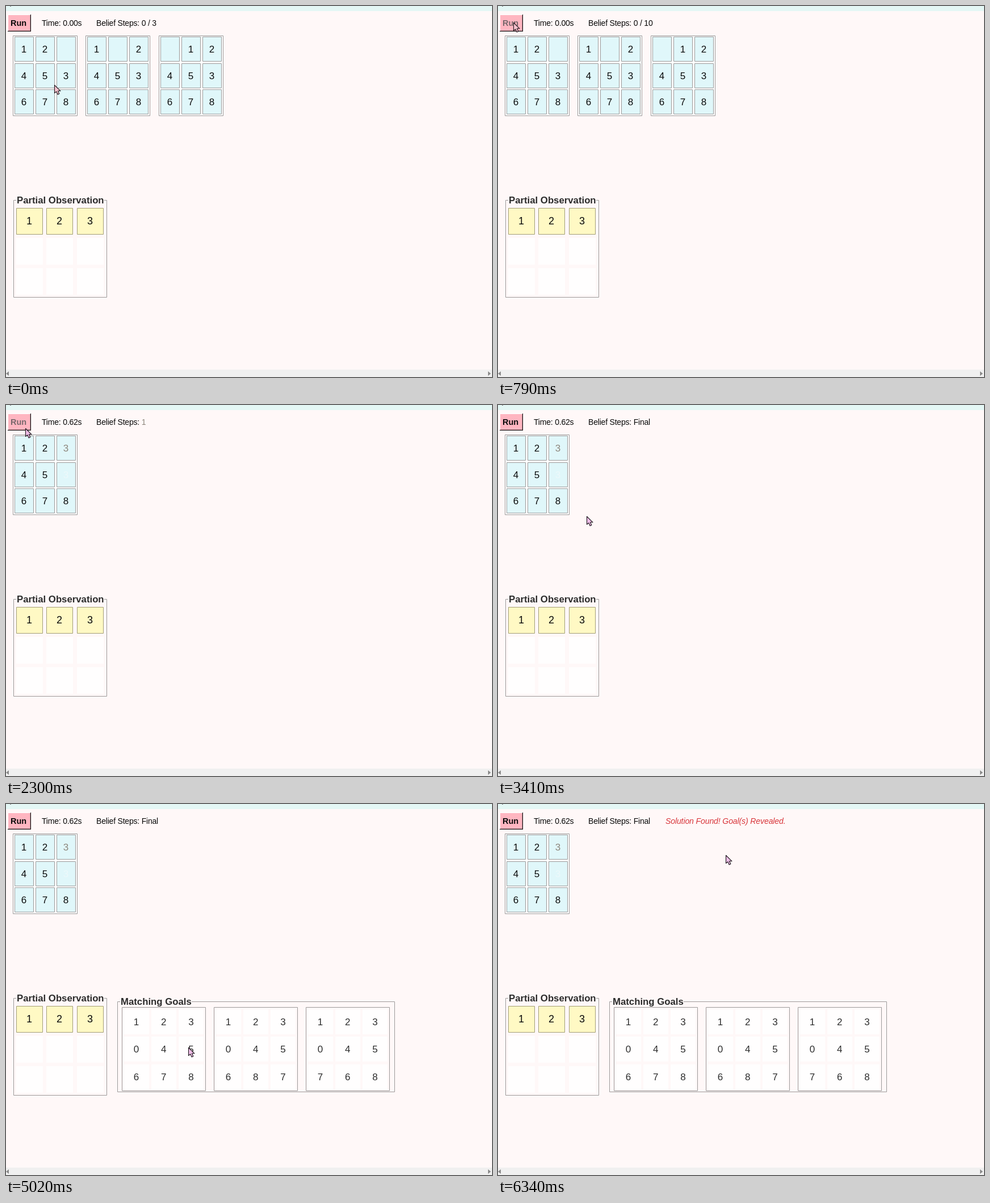
Write an HTML page with a canvas that moves like this. It is 856x654 px and loops after 7340 ms.

```html
<!DOCTYPE html>
<html lang="en">
<head>
<meta charset="utf-8">
<title>Belief state puzzle</title>
<style>
html, body { margin: 0; width: 100%; height: 100%; overflow: hidden; background: #fff8f8; }
canvas { display: block; }
</style>
</head>
<body>
<canvas id="stage" width="856" height="654"></canvas>
<script>
const ctx = document.getElementById('stage').getContext('2d');
const LOOP = 7340;
const BG = '#fff8f8', LINE = '#9c9a9a', CYAN = '#e0f7fa', INK = '#0a0a0a';
const FAMILY = '"Liberation Sans", Arial, sans-serif';

// start, end, number of jumps, target of the pointer tip
const MOVES = [
  [100, 390, 4, 27, 29],
  [2300, 2300, 1, 34, 41],
  [2600, 2910, 4, 129, 161],
  [3310, 3410, 2, 156, 196],
  [4720, 5020, 4, 321, 429],
  [5330, 5330, 1, 328, 429],
  [5730, 5730, 1, 335, 421],
  [5840, 6340, 6, 401, 90]
];

function rect(x, y, w, h, fill) {
  ctx.fillStyle = fill;
  ctx.fillRect(x, y, w, h);
}

function frame(x, y, w, h, color = LINE) {
  ctx.strokeStyle = color;
  ctx.lineWidth = 1;
  ctx.strokeRect(x + 0.5, y + 0.5, w - 1, h - 1);
}

function text(str, x, y, size, { color = INK, style = '', align = 'left', spacing = 0 } = {}) {
  ctx.font = `${style} ${size}px ${FAMILY}`;
  ctx.letterSpacing = spacing + 'px';
  ctx.textAlign = align;
  ctx.fillStyle = color;
  ctx.fillText(str, x, y);
}

function digit(str, x, y, size, color) {
  text(str, x, y, size, { color, align: 'center' });
}

function triangle(x, y, dx) {
  ctx.fillStyle = '#8a8a8a';
  ctx.beginPath();
  ctx.moveTo(x, y);
  ctx.lineTo(x - dx, y - 4);
  ctx.lineTo(x - dx, y + 4);
  ctx.fill();
}

function board(x, tiles, solved) {
  rect(x, 52, 114, 142, '#fff');
  frame(x, 52, 114, 142);
  [...tiles].forEach((n, i) => {
    const cx = x + 3 + 37 * (i % 3);
    const cy = Math.floor(54.5 + 46.5 * Math.floor(i / 3));
    rect(cx, cy, 34, 44, CYAN);
    frame(cx, cy, 34, 44);
    const color = solved && i === 2 ? '#8c857b' : solved && i === 5 ? '#edf8fa' : INK;
    digit(n, cx + 16.5, cy + 28, 17, color);
  });
}

function header(t) {
  rect(0, 0, 856, 9, '#e4f7f5');
  rect(7, 0, 2, 1, '#777');

  const pressed = t >= 590 && t < 690;
  const disabled = t >= 690 && t < 3310;
  const shift = pressed ? 1 : 0;
  rect(3, 15, 41, 30, pressed ? '#fff' : '#151012');
  rect(3, 15, 40, 29, pressed ? '#151012' : '#fff');
  rect(4, 16, 39, 28, '#b98990');
  rect(4, 16, 38, 27, '#ffb6c1');
  text('Run', 8 + shift, 35 + shift, 14.5, { style: 'bold', color: disabled ? '#77676b' : INK });

  text(`Time: ${t < 1190 ? '0.00' : '0.62'}s`, 63, 35, 14, { spacing: -0.2 });
  const label = 'Belief Steps: ';
  text(label, 159, 35, 14, { spacing: -0.2 });
  const x = 159 + ctx.measureText(label).width;
  const step = t < 790 ? '0 / 3' : t < 1190 ? '0 / 10' : t < 3310 ? '1' : 'Final';
  text(step, x, 35, 14, { spacing: -0.2, color: step === '1' ? '#8c857b' : INK });

  if (t >= 5330) {
    text('Solution Found! Goal(s) Revealed.', 295, 35, 14,
      { style: 'italic', color: '#d8353a', spacing: -0.1 });
  }
}

function beliefs(t) {
  const solved = t >= 1190;
  board(12, solved ? '12345 678' : '12 453678', solved);
  if (solved) {
    // the tile slides up and the blank takes its place
    const swap = [['3', 2], ['3', 5]];
    for (const [n, i] of swap) {
      const y = i === 2 ? 54 : 101;
      rect(90, y + 1, 32, 42, CYAN);
      digit(n, 105.5, y + 28, 17, i === 2 ? '#8c857b' : '#edf8fa');
    }
  }
  if (t < 1290) {
    ctx.globalAlpha = solved ? 0.4 : 1;
    board(140, '1 2453678');
    board(269, ' 12453678');
    ctx.globalAlpha = 1;
  }
}

function group(title, x, y, w, h, titleWidth) {
  frame(x, y, w, h);
  rect(x + 5, y - 1, titleWidth, 3, BG);
  text(title, x + 6, y + 6, 16.75, { style: 'bold', color: '#2c2c2c' });
}

function observation() {
  group('Partial Observation', 13, 342, 165, 172, 155);
  for (let i = 0; i < 9; i++) {
    const x = Math.round(18 + 53.4 * (i % 3));
    const row = Math.floor(i / 3);
    const y = 356 + 53 * row;
    rect(x, y, 47, 47, row ? '#fffefe' : '#fff9c4');
    if (!row) {
      frame(x, y, 47, 47, '#a29f78');
      digit(i + 1, x + 23, y + 29, 18, INK);
    }
  }
}

function goals() {
  group('Matching Goals', 196, 348, 489, 160, 126);
  ['123045678', '123045687', '123045768'].forEach((tiles, k) => {
    const x = 204 + 162 * k;
    frame(x, 358, 148, 148);
    [...tiles].forEach((n, i) => {
      const cx = x + 25.5 + 48.3 * (i % 3);
      const cy = 384 + 48.3 * Math.floor(i / 3);
      rect(Math.round(cx - 22), Math.round(cy - 22), 44, 44, '#fffefe');
      digit(n, cx, Math.round(cy + 6), 17, '#2c2c2c');
    });
  });
}

function pointerAt(t) {
  let x = 85, y = 139;
  for (const [start, end, count, tx, ty] of MOVES) {
    if (t < start) break;
    const gap = (end - start) / Math.max(1, count - 1);
    const done = gap ? Math.min(count, Math.floor((t - start) / gap + 0.02) + 1) : 1;
    const p = done / count;
    x += (tx - x) * p;
    y += (ty - y) * p;
  }
  return [Math.round(x), Math.round(y)];
}

function pointer(t) {
  const [x, y] = pointerAt(t);
  const pts = [[0, 0], [0, 14], [3.2, 11.3], [5.6, 16.5], [8.3, 15.3], [6, 10.3], [10.5, 10.3]];
  ctx.beginPath();
  for (const [px, py] of pts) ctx.lineTo(x + 0.5 + px, y + 0.5 + py);
  ctx.closePath();
  ctx.fillStyle = t < 1190 ? '#f9c3cf' : '#efbde7';
  ctx.fill();
  ctx.strokeStyle = '#1c151b';
  ctx.lineWidth = 1.1;
  ctx.lineJoin = 'round';
  ctx.stroke();
}

function draw(t) {
  rect(0, 0, 856, 654, BG);
  header(t);
  beliefs(t);
  observation();
  if (t >= 4320) goals();
  rect(0, 641, 856, 13, '#f0f0f0');
  triangle(0, 648, -5);
  triangle(854, 648, 5);
  pointer(t);
}

const begin = performance.now();
function tick() {
  draw((performance.now() - begin) % LOOP);
  requestAnimationFrame(tick);
}
tick();
</script>
</body>
</html>
```
